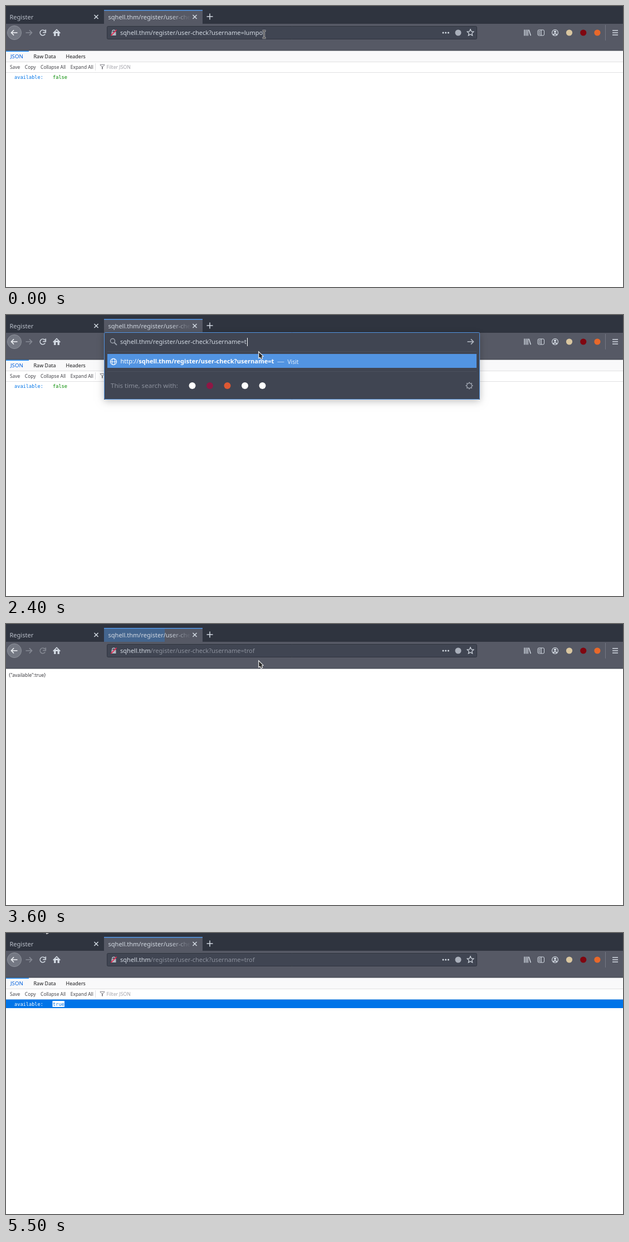
Write an HTML page with a canvas that moves like this. It is 1108 by 505 pixels and loops after 5.8 s.

```html
<!DOCTYPE html>
<html lang="en">
<head>
<meta charset="utf-8">
<title>User check</title>
<style>
html, body { margin: 0; width: 100%; height: 100%; overflow: hidden; background: #fff; }
canvas { display: block; width: 1108px; height: 505px; }
</style>
</head>
<body>
<canvas id="stage"></canvas>
<script>
const W = 1108, H = 505, LOOP = 5800, STEP = 100;
const SANS = '"Noto Sans", sans-serif';
const MONO = '"DejaVu Sans Mono", monospace';
const LIGHT = '#d3dae3', DIM = '#8c919d', BLUE = '#5294e2', FIELD = '#404552', BAR = '#565965';
const HOST = 'sqhell.thm', PATH = '/register/user-check?username=';
const OLD_USER = 'lumpo', NEW_USER = 'trof';
const UI = 11.04, URL_X = 205, ICON_Y = 48;

// Moments of the scene, in ms
const FOCUS = 700, SELECT = 1200, TYPE = 2400, CARET_OFF = 3100, ENTER = 3300,
      RAW = 3400, LOADED = 3600, VIEWER = 3700, HOVER = 4100, READY = 4200, PICK = 4700;

const canvas = document.getElementById('stage');
const ctx = canvas.getContext('2d');
const dpr = window.devicePixelRatio || 1;
canvas.width = W * dpr;
canvas.height = H * dpr;

const during = (q, from, to) => q >= from && q < to;
const clamp = (v, lo, hi) => Math.min(hi, Math.max(lo, v));
const lerp = (a, b, k) => a + (b - a) * k;

function rect(x, y, w, h, color) {
  ctx.fillStyle = color;
  ctx.fillRect(x, y, w, h);
}

function stroke(color, width) {
  ctx.strokeStyle = color;
  ctx.lineWidth = width;
  ctx.stroke();
}

function box(x, y, w, h, fill, edge) {
  ctx.beginPath();
  ctx.roundRect(x + 0.5, y + 0.5, w - 1, h - 1, 2);
  ctx.fillStyle = fill;
  ctx.fill();
  stroke(edge, 1);
}

function dot(x, y, r, color) {
  ctx.beginPath();
  ctx.arc(x, y, r, 0, Math.PI * 2);
  ctx.fillStyle = color;
  ctx.fill();
}

function oval(x, y, rx, ry, color, width = 1.2) {
  ctx.beginPath();
  ctx.ellipse(x, y, rx, ry, 0, 0, Math.PI * 2);
  stroke(color, width);
}

function arc(x, y, r, from, to, color, width) {
  ctx.beginPath();
  ctx.arc(x, y, r, from, to);
  stroke(color, width);
}

function line(x1, y1, x2, y2, color, width = 1.5) {
  ctx.beginPath();
  ctx.moveTo(x1, y1);
  ctx.lineTo(x2, y2);
  stroke(color, width);
}

// A line of the given half length through a point.
function bar(x, y, r, angle, color, width = 1.5) {
  const dx = r * Math.cos(angle), dy = r * Math.sin(angle);
  line(x - dx, y - dy, x + dx, y + dy, color, width);
}

function plus(x, y, r, angle, color) {
  bar(x, y, r, angle, color);
  bar(x, y, r, angle + Math.PI / 2, color);
}

// Two strokes meeting in a tip that points along the angle.
function chevron(x, y, size, angle, color, width = 1.6) {
  ctx.beginPath();
  for (const side of [-1, 0, 1]) {
    const a = angle + side * Math.PI * 0.75, r = side ? size : 0;
    ctx.lineTo(x + r * Math.cos(a), y + r * Math.sin(a));
  }
  stroke(color, width);
}

function arrow(x, color, dir) {
  bar(x, ICON_Y, 5.5, 0, color, 1.6);
  chevron(x + 5.5 * dir, ICON_Y, 6.5, dir > 0 ? 0 : Math.PI, color);
}

// A closed outline whose radius alternates between two values.
function star(x, y, points, outer, inner, color) {
  ctx.beginPath();
  for (let i = 0; i < points * 2; i++) {
    const a = i * Math.PI / points - Math.PI / 2, r = i % 2 ? inner : outer;
    ctx.lineTo(x + r * Math.cos(a), y + r * Math.sin(a));
  }
  ctx.closePath();
  stroke(color, 1.2);
}

// Draws text and returns its right edge.
function text(str, x, y, size, color, family = SANS, weight = 400) {
  ctx.font = `${weight} ${size}px ${family}`;
  ctx.fillStyle = color;
  ctx.fillText(str, x, y);
  return x + ctx.measureText(str).width;
}

function tabs(q) {
  rect(0, 0, W, 32, '#2f343f');
  text('Register', 6.5, 23.5, UI, '#bcc2cc');
  rect(176, 7, 177, 25, BAR);
  if (during(q, LOADED, LOADED + 300)) {
    const k = (q - LOADED) / 300;
    ctx.globalAlpha = 0.5 * (1 - k);
    rect(176, 7, Math.min(177, 109 + 204 * k), 25, '#3373b8');
    ctx.globalAlpha = 1;
  }
  rect(176, 7, 177, 1.6, BLUE);
  const fade = ctx.createLinearGradient(296, 0, 332, 0);
  fade.addColorStop(0, LIGHT);
  fade.addColorStop(1, 'rgba(211,218,227,0)');
  text('sqhell.thm/register/user-che', 183.5, 23.5, UI, fade);
  for (const x of [162, 339]) plus(x, 19.5, 5, Math.PI / 4, LIGHT);
  plus(366, 19, 5.5, 0, LIGHT);
}

function home(x, y) {
  chevron(x, y - 5.5, 9, -Math.PI / 2, LIGHT);
  for (const side of [-1, 1]) {
    rect(x + side * 3.2 - 1.7, y - 1, 3.4, 7, LIGHT);
  }
  rect(x - 4, y - 2, 8, 3, LIGHT);
}

function toolbar(q) {
  rect(0, 32, W, 48, BAR);
  rect(0, 79.5, W, 1, '#3a3e49');
  dot(15, ICON_Y, 12.5, '#747883');
  oval(15, ICON_Y, 12.5, 12.5, '#8e929b', 1);
  arrow(15, '#eceff3', -1);
  arrow(41, '#868a94', 1);

  const color = during(q, ENTER, READY) ? '#868a94' : LIGHT;
  arc(66, ICON_Y, 4.8, 0.5, 5.6, color, 1.6);
  chevron(71.2, 47.6, 5, Math.PI / 4, color, 1.8);
  home(91, ICON_Y);

  for (let i = 0; i < 4; i++) {
    bar(931 + i * 3 + (i > 2 ? 0.6 : 0), ICON_Y, 5.5, Math.PI / 2 - (i > 2 ? 0.3 : 0) * -1 - (i > 2 ? 0.6 : 0), LIGHT);
  }
  box(954.5, 42.5, 12.5, 11, BAR, LIGHT);
  bar(961, ICON_Y, 5, Math.PI / 2, LIGHT, 1.2);
  for (let i = -1; i <= 1; i++) {
    bar(957.8, ICON_Y + i * 2.5, 1.4, 0, LIGHT, 1.2);
    bar(1094, ICON_Y + i * 4, 5, 0, LIGHT);
  }
  oval(986, ICON_Y, 5.4, 5.4, LIGHT);
  dot(986, 46.3, 2.1, LIGHT);
  arc(986, 53, 3.2, Math.PI, Math.PI * 2, LIGHT, 1.8);
  ['#d9c6a0', '#800610', '#e8682a'].forEach((c, i) => dot(1011.5 + i * 25.2, ICON_Y, 5.6, c));
  rect(1076, 34, 1, 28, '#747883');
}

function fieldIcons(open) {
  if (open) {
    oval(191.5, 46.5, 4, 4, '#9ba1ac', 1.5);
    line(194.5, 49.5, 199, 54, '#9ba1ac', 1.8);
    arrow(834, '#b3b9c3', 1);
    return;
  }
  arc(193.5, 46, 2.7, Math.PI, Math.PI * 2, '#b3b9c3', 1.4);
  rect(189.5, 46.5, 8, 6.5, '#b3b9c3');
  bar(193.5, ICON_Y, 7.2, -Math.PI / 4, '#e22850', 1.7);
  for (let i = -1; i <= 1; i++) dot(789.7 + i * 4.7, ICON_Y, 1.5, LIGHT);
  dot(812, ICON_Y, 5.5, '#a9afba');
  star(834, ICON_Y, 5, 6.2, 2.9, LIGHT);
}

function suggestions(typed) {
  for (const y of [65, 101]) rect(182, y, 663, 1, '#4b505c');
  rect(182, 70, 663, 25, BLUE);
  oval(193, 84, 5.6, 5.6, '#fff', 1.1);
  oval(193, 84, 2.6, 5.6, '#fff', 1);
  bar(193, 84, 5.5, 0, '#fff', 1);
  let x = text('http://', URL_X + 0.5, 87.3, UI, '#fff');
  x = text(HOST + PATH + typed, x, 87.3, UI, '#fff', SANS, 700);
  rect(x + 6, 84, 12, 1, '#b9d3f2');
  text('Visit', x + 24, 87.5, 10.2, '#e4effb');
  text('This time, search with:', 188, 131, 11.55, DIM);
  const engines = ['#fff', '#8e1745', '#de5833', '#fff', '#fff'];
  engines.forEach((c, i) => dot(334.5 + i * 31.5, 127, 6, c));
  star(832, 127, 8, 6, 4, '#a4aab5');
}

function address(q) {
  const focused = during(q, FOCUS, ENTER);
  const open = during(q, TYPE, ENTER);
  const selected = during(q, SELECT, TYPE);
  const typed = NEW_USER.slice(0, clamp(Math.floor((q - TYPE) / 100), 1, NEW_USER.length));
  const user = q < TYPE ? OLD_USER : typed;

  if (focused) {
    ctx.save();
    ctx.shadowColor = 'rgba(0,0,0,0.25)';
    ctx.shadowBlur = 13 * dpr;
    ctx.shadowOffsetY = 3 * dpr;
    rect(176, 31, 675, open ? 121 : 34, FIELD);
    ctx.restore();
    box(176, 31, 675, open ? 121 : 34, FIELD, BLUE);
  } else {
    box(181, 36, 665, 24, FIELD, '#2f343f');
  }
  fieldIcons(open);

  const color = q >= ENTER ? DIM : LIGHT;
  let x = text(HOST, URL_X, 52.3, UI, LIGHT);
  x = text(PATH, x, 52.3, UI, color);
  const end = x + ctx.measureText(user).width;
  if (selected) rect(x, 41, end - x, 15, BLUE);
  text(user, x, 52.3, UI, selected ? '#fff' : color);
  if (focused && !selected && q < CARET_OFF) rect(Math.round(end) + 1, 41, 1, 15, '#fff');
  if (open) suggestions(typed);
}

// Sets labels side by side with an even gap.
function row(labels, x, y, size, gap, color) {
  for (const label of labels) x = text(label, x, y, size, color) + gap;
}

function viewer(q) {
  rect(0, 80.5, W, 20, '#f9f9fa');
  for (const y of [100, 119]) rect(0, y, W, 1, '#e0e0e2');
  rect(0, 80.5, 41, 1.5, '#0a84ff');
  text('JSON', 8, 93.7, 9.6, '#0060df');
  row(['Raw Data', 'Headers'], 49.5, 93.7, 9, 18, '#18181a');
  row(['Save', 'Copy', 'Collapse All', 'Expand All'], 7, 112.7, 8.4, 8.6, '#45454a');
  rect(160, 103, 1, 13, '#e0e0e2');
  bar(173, 105.5, 4, 0, '#85858c', 1);
  chevron(173, 110, 6, Math.PI / 2, '#85858c', 1);
  bar(173, 111, 2.5, Math.PI / 2, '#85858c', 2);
  text('Filter JSON', 180.5, 112.7, 8.7, '#a3a3aa');

  const picked = q >= PICK;
  if (q >= HOVER) rect(0, 119.5, W, 15.5, picked ? '#0074e8' : '#f0f9fe');
  if (picked) rect(83.5, 122, 21.5, 11, '#fff');
  text('available:', 15, 130.6, 8.65, picked ? '#fff' : '#0074e8', MONO);
  text(q < RAW ? 'false' : 'true', 84, 130.6, 8.65, picked ? '#0074e8' : '#058b00', MONO);
}

function page(q) {
  rect(0, 80, W, H - 80, '#fff');
  if (during(q, RAW, VIEWER)) text('{"available":true}', 5, 95, 8.43, '#38383d');
  else viewer(q);
}

// Pointer stops; bend lifts or drops the way there, ease shapes its pace.
const linear = k => k;
const easeOut = k => 1 - (1 - k) ** 2;
const easeIn = k => k * k;
const MOVES = [
  { from: 600, to: 1000, x: 455, y: 48, bend: -20, ease: linear },
  { from: 1100, to: 1400, x: 453, y: 65, bend: 0, ease: easeIn },
  { from: 3600, to: 4500, x: 96, y: 127, bend: 0, ease: easeOut },
  { from: 4800, to: 5500, x: 68, y: -13, bend: 45, ease: easeIn }
];

function pointerAt(q) {
  let x = 463, y = 51;
  for (const m of MOVES) {
    const k = clamp((q - m.from) / (m.to - m.from), 0, 1);
    x = lerp(x, m.x, m.ease(k));
    y = lerp(y, m.y, m.ease(k)) + m.bend * Math.sin(Math.PI * k);
  }
  return [x, y];
}

function beam(x, y, color, width) {
  bar(x, y, 6, Math.PI / 2, color, width);
  for (const side of [-1, 1]) bar(x, y + side * 6.5, 3, 0, color, width);
}

function arrowhead(x, y) {
  line(x + 4, y + 9, x + 6.5, y + 14.5, '#fff', 4);
  ctx.beginPath();
  ctx.moveTo(x + 0.7, y + 0.8);
  ctx.lineTo(x + 0.7, y + 12.6);
  ctx.lineTo(x + 9, y + 9.2);
  ctx.closePath();
  ctx.fillStyle = '#2b2b2b';
  ctx.fill();
  stroke('#fff', 1.1);
  line(x + 3.6, y + 8, x + 6.1, y + 13.5, '#2b2b2b', 2);
}

function pointer(q) {
  const [x, y] = pointerAt(q);
  if (q < 1300 || during(q, 4400, 4900)) {
    beam(x + 0.5, y, 'rgba(255,255,255,0.85)', 2.6);
    beam(x + 0.5, y, '#222', 1.1);
  } else {
    arrowhead(x, y);
  }
}

function draw(now) {
  const q = Math.floor((now % LOOP) / STEP) * STEP;
  ctx.setTransform(dpr, 0, 0, dpr, 0, 0);
  page(q);
  tabs(q);
  toolbar(q);
  address(q);
  pointer(q);
}

const start = performance.now();
function tick() {
  draw(performance.now() - start);
  requestAnimationFrame(tick);
}
tick();
</script>
</body>
</html>
```
